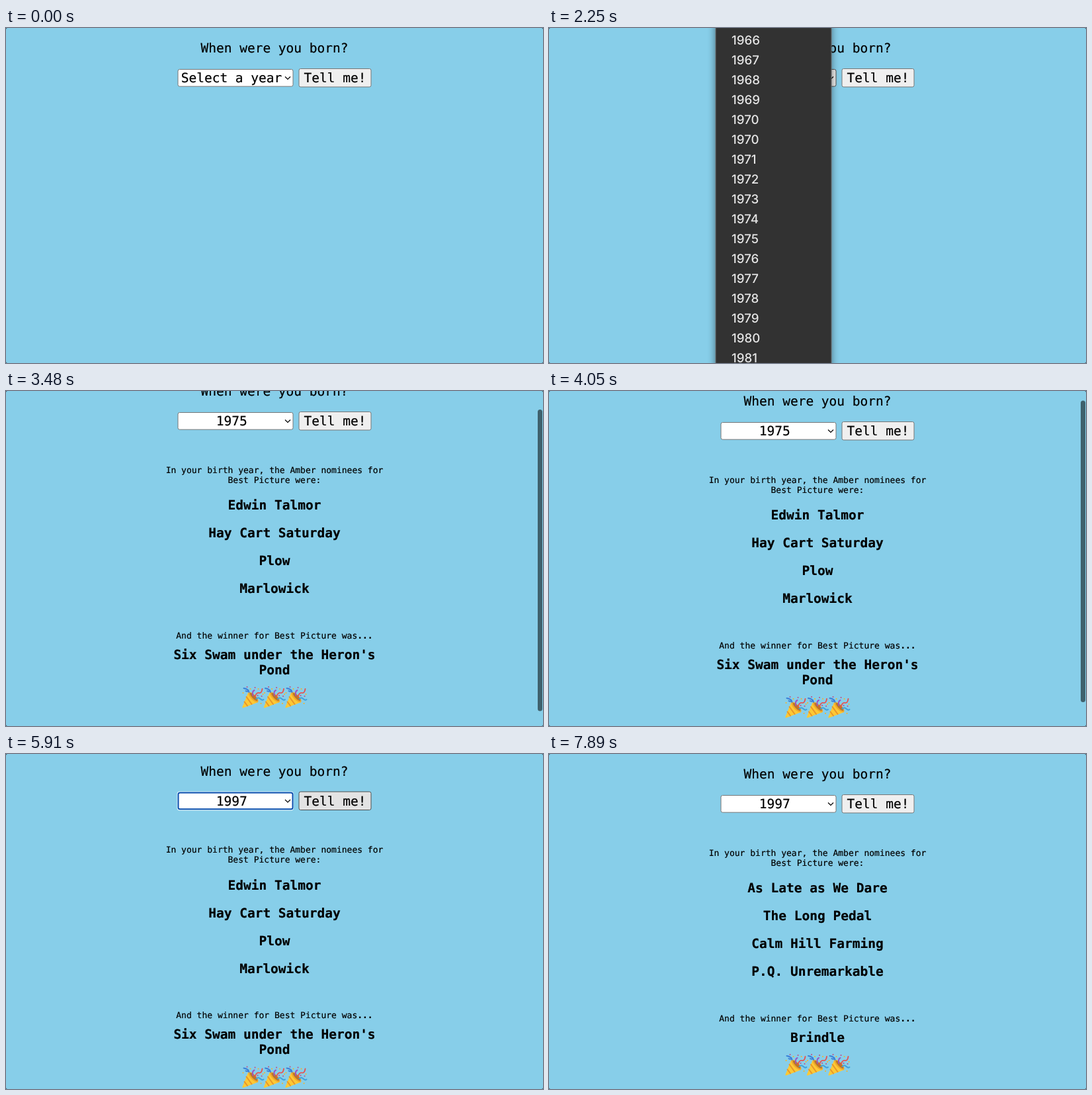
Recreate the animation shown at these times as an HTML page. Size 812 px wide and 506 px high, loop 8070 ms.

```html
<!DOCTYPE html>
<html lang="en">
<head>
<meta charset="utf-8">
<title>When were you born?</title>
<style>
html, body { margin: 0; width: 100%; height: 100%; overflow: hidden; background: #2f4a55; }
svg { display: block; }
text { font: 19.5px "DejaVu Sans Mono", monospace; white-space: pre; text-rendering: geometricPrecision; }
#page text { stroke: #000; stroke-width: .2px; }
.mid { text-anchor: middle; }
#page .small { font-size: 13px; }
.bold { font-weight: bold; }
#menu { filter: drop-shadow(0 2px 6px rgba(0, 0, 0, .45)); }
#menu text { font: 500 18.7px Inter, sans-serif; fill: #e6e6e6; }
</style>
</head>
<body>
<svg id="stage" width="812" height="506" viewBox="0 0 812 506">
  <defs>
    <g id="popper" fill="none" stroke-linecap="round">
      <path d="M1 31Q0 33 2.500 32.500L25 24Q21 12 10 8.500Z" fill="#fdc935"/>
      <path d="M7 16 15 27M4 23.500 8.500 29.500" stroke="#e8952a" stroke-width="2"/>
      <ellipse cx="17.500" cy="16.500" rx="10" ry="4" transform="rotate(46 17.500 16.500)" fill="#f0a92c"/>
      <ellipse cx="18" cy="16" rx="8" ry="2.400" transform="rotate(46 18 16)" fill="#b9752a"/>
      <path d="M11 9Q10 4 3 3M6 7Q9 9 10 6" stroke="#3b7fd9" stroke-width="2"/>
      <path d="M17 14Q15 8 19 6" stroke="#9a55c4" stroke-width="2"/>
      <path d="M20 16Q22 9 26 10T31 4" stroke="#e8504f" stroke-width="1.800"/>
      <path d="M22 19Q25 16 28 19T33 20" stroke="#3fa0dc" stroke-width="1.800"/>
      <path d="M2 10h.1M13 4h.1M29 26h.1M32 12h.1M25 4h.1" stroke="#f4b32c" stroke-width="2"/>
      <path d="M8 1h.1M20 2h.1M30 15h.1M24 14h.1" stroke="#c0508a" stroke-width="2"/>
    </g>
  </defs>
  <rect width="812" height="506" rx="2.500" fill="#87cee9"/>
  <g id="page">
    <text class="mid" x="406" y="37">When were you born?</text>
    <rect id="halo" x="258.500" y="61" width="176.500" height="29" rx="4" fill="#fff" fill-opacity=".7"/>
    <rect id="box" rx="2.500"/>
    <text id="pick" y="82"></text>
    <path d="M422 73.500l4 4 4-4" fill="none" stroke="#000" stroke-width="1.200"/>
    <rect id="button" x="443" y="61.500" width="109" height="27.500" rx="2.500"/>
    <text class="mid" x="497.500" y="82">Tell me!</text>
    <g id="result"></g>
  </g>
  <rect id="thumb" x="804" width="7" rx="3.500"/>
  <g id="menu">
    <rect id="panel" x="252" width="175" height="700" rx="8" fill="#323232" stroke="#6b6f70"/>
    <rect id="glow" x="257" width="165" height="30" rx="5" fill="#0059d1"/>
    <g id="list"><path id="tick" fill="none" stroke="#e6e6e6" stroke-width="1.900" stroke-linecap="round"/></g>
  </g>
</svg>
<script>
const LOOP = 8070, STEP = 30, ROW = 30;
const $ = id => document.getElementById(id);
const set = (id, attrs) => { for (const k in attrs) $(id).setAttribute(k, attrs[k]); };

// Straight lines between [time, value] points, held at both ends
function lerp(t, points) {
  let [t0, v0] = points[0];
  for (const [t1, v1] of points) {
    if (t < t1) return t <= t0 ? v0 : v0 + (v1 - v0) * (t - t0) / (t1 - t0);
    [t0, v0] = [t1, v1];
  }
  return v0;
}

// Value of the last [time, value] pair already reached
const held = (t, pairs) => pairs.reduce((v, [t0, v0]) => t >= t0 ? v0 : v, pairs[0][1]);
const within = (t, a, b) => t >= a && t < b;

const years = ["Select a year"];
for (let y = 1928; y <= 2018; y++) years.push(y, ...(y === 1970 ? [y] : []));
years.forEach((y, i) => $("list").insertAdjacentHTML("beforeend",
  `<text x="276" y="${i * ROW + 7}">${y}</text>`));

const line = (text, y, cls) => `<text class="mid ${cls}" x="406" y="${y}">${text}</text>`;

function results(nominees, winner) {
  const top = 453 + 23 * (winner.length - 1);
  return line("In your birth year, the Amber nominees for", 153.5, "small")
    + line("Best Picture were:", 168.5, "small")
    + nominees.map((n, i) => line(n, 209 + 42 * i, "bold")).join("")
    + line('And the winner for Best Picture was<tspan class="bold">...</tspan>', 403.5, "small")
    + winner.map((w, i) => line(w, 434.5 + 23 * i, "bold")).join("")
    + [0, 1, 2].map(i => `<use href="#popper" x="${356.5 + 32.5 * i}" y="${top}"/>`).join("");
}

const pages = ["",
  results(["Edwin Talmor", "Hay Cart Saturday", "Plow", "Marlowick"],
    ["Six Swam under the Heron's", "Pond"]),
  results(["As Late as We Dare", "The Long Pedal", "Calm Hill Farming", "P.Q. Unremarkable"],
    ["Brindle"])];
const heights = [506, 562, 539];
let shown = 0;

function drawControls(t) {
  const year = held(t, [[0, ""], [2430, "1975"], [5700, "1997"]]);
  const ring = within(t, 2430, 2850) || within(t, 5700, 6060);
  const open = within(t, 720, 2430) || within(t, 4410, 5700);
  const hover = within(t, 420, 2640) || within(t, 4380, 5880);
  const inset = ring ? .5 : 0;
  $("pick").textContent = year || "Select a year";
  set("pick", { x: year ? 317.7 : 264.7 });
  set("halo", { opacity: +ring });
  set("box", {
    x: 260 + inset, y: 62.5 + inset, width: 174 - 2 * inset, height: 25.7 - 2 * inset,
    fill: open ? "#ececec" : "#fff",
    stroke: ring ? "#0b4fae" : hover ? "#4f4f4f" : "#767676",
    "stroke-width": ring ? 2 : 1
  });
  const fill = held(t, [[0, "#efefef"], [2610, "#e3e3e3"], [2850, "#f5f5f5"], [2970, "#e3e3e3"],
    [3210, "#efefef"], [5880, "#e3e3e3"], [6060, "#f5f5f5"], [6150, "#e3e3e3"], [6240, "#efefef"]]);
  set("button", { fill, stroke: fill === "#e3e3e3" ? "#4f4f4f" : "#767676" });
}

function drawPage(t) {
  const n = held(t, [[0, 0], [2970, 1], [6120, 2]]);
  if (n !== shown) $("result").innerHTML = pages[shown = n];
  const scroll = lerp(t, [[3390, 0], [3420, 8], [3480, 30], [3540, 56], [3870, 56], [3990, 22],
    [4140, 4.5], [6450, 4.5], [6570, 34], [6960, 34], [7050, 8], [7140, 0]]);
  set("page", { transform: `translate(0 ${-scroll})` });
  const ratio = 506 / heights[n];
  const fade = t < 6480 ? lerp(t, [[4560, .53], [4830, 0]]) : lerp(t, [[7620, .53], [7890, 0]]);
  set("thumb", { y: 1 + scroll * ratio, height: 506 * ratio, opacity: t < 3420 ? 0 : fade });
}

function drawMenu(t) {
  const second = t > 4000;
  const alpha = second
    ? t < 4590 ? 0 : lerp(t, [[5700, 1], [5850, 0]])
    : t < 900 ? 0 : lerp(t, [[2400, 1], [2550, 0]]);
  const top = second
    ? lerp(t, [[5010, -1396.5], [5130, -1756.5]])
    : lerp(t, [[1410, 78], [1470, -240], [1560, -860], [1650, -1152]]);
  const row = Math.floor(1e-6 + (second
    ? lerp(t, [[4590, 1], [4830, 9], [5370, 9], [5400, 10]])
    : lerp(t, [[1110, 1], [1260, 6], [1830, 6], [1890, 8]])));
  const blink = within(t, 2250, 2340) || within(t, 5550, 5640);
  set("menu", { opacity: alpha, visibility: alpha ? "visible" : "hidden" });
  set("panel", { y: Math.max(-20, top - 21) });
  set("list", { transform: `translate(0 ${top})` });
  set("glow", { y: (second ? 58.5 : 63) + row * ROW, opacity: +(t >= 1110 && !blink) });
  set("tick", { d: `M263 ${(second ? 49 * ROW : 0) + 1.5}l3 3.500 5-8` });
}

const start = performance.now();
function frame(now) {
  const elapsed = Math.max(0, now - start) % LOOP;
  const t = Math.floor(elapsed / STEP) * STEP;
  drawControls(t);
  drawPage(t);
  drawMenu(t);
  requestAnimationFrame(frame);
}
frame(start);
</script>
</body>
</html>
```
